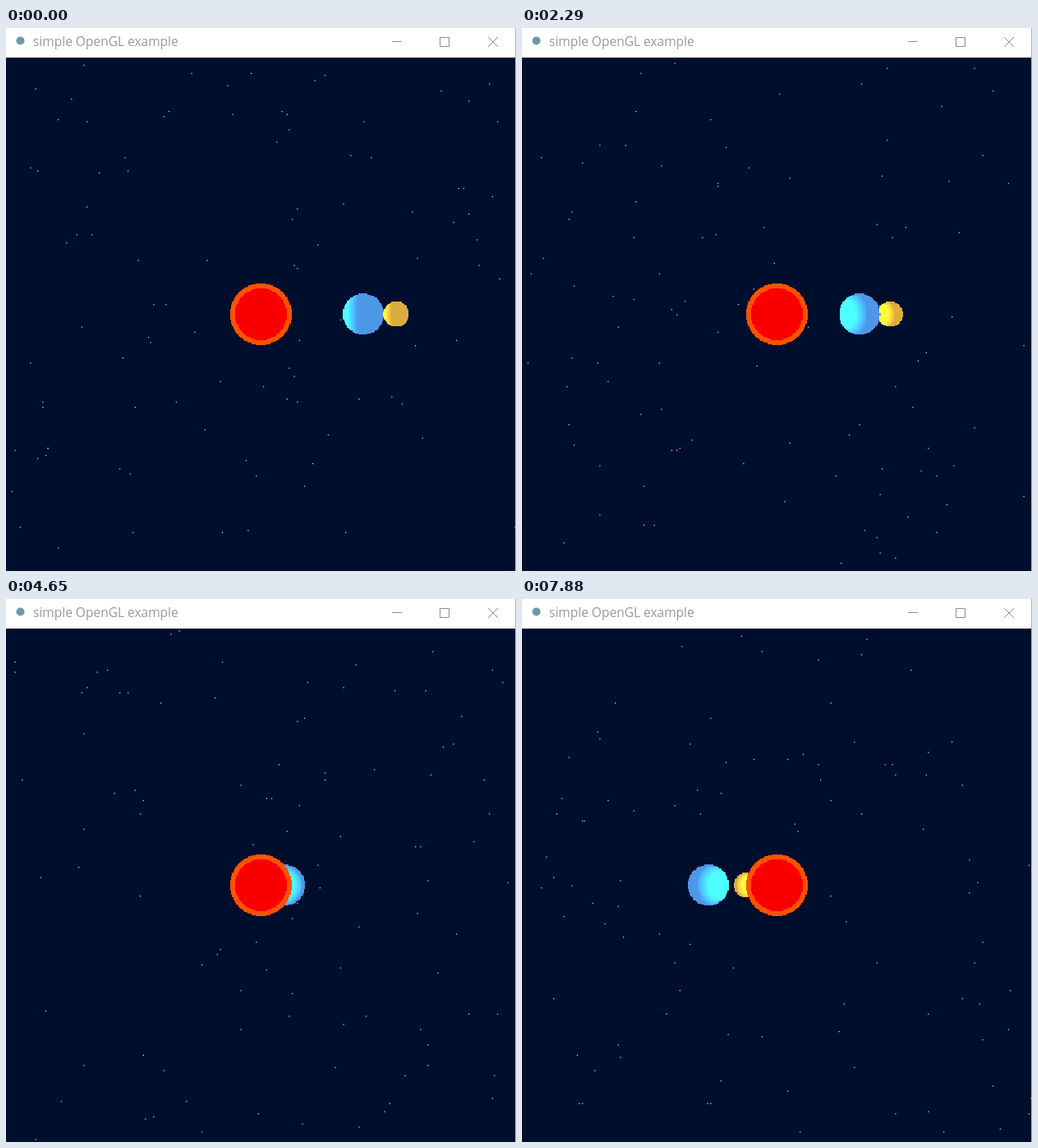
Write an HTML page with a canvas that moves like this. It is 621 px wide and 661 px high and loops after 8000 ms.

```html
<!DOCTYPE html>
<html lang="en">
<head>
<meta charset="utf-8">
<title>Orbits</title>
<style>
  html, body { margin: 0; width: 100%; height: 100%; overflow: hidden; background: #fff; }
  .window { position: relative; width: 621px; height: 661px; overflow: hidden; }
  .window > * { position: absolute; left: 0; top: 0; }
</style>
</head>
<body>
<div class="window">
  <canvas id="sky" width="621" height="661"></canvas>
  <svg width="621" height="661" fill="none" stroke="#8c8c8c">
    <circle cx="17.5" cy="15.5" r="5" fill="#6c98a8" stroke="none"/>
    <text x="33" y="22" fill="#999" stroke="none" font-size="15.5" font-family="'Open Sans', 'Noto Sans', sans-serif">simple OpenGL example</text>
    <path d="M470 16.5h12M528.5 11.5h11v11h-11zM587 11l12 12M599 11l-12 12"/>
    <path d="M620.5 0V661" stroke="#b4b4b8"/>
    <path id="cursor" d="M479.500 544.500v17l4-3.700 3 7 3-1.300-3-6.700h5.300z" fill="#fff" stroke="#000"/>
  </svg>
</div>
<script>
const LOOP = 8000;
const TOP = 36;
const LEFT = -2;
const CELL = 1.25; // the 500-pixel scene is shown enlarged
const CENTER = { x: 310.5, y: 348.5 };
const BOX = { x: 118, y: 308, w: 386, h: 82 };
const STARS = 100;

// The scene redraws in uneven steps: knots in ms and the steps between them.
const KNOTS = [0, 120, 960, 1110, 1230, 2140, 2290, 3290, 3440, 3680, 4380, 4530, 4650, 5380, 5780, 6780, 6900, 7880, LOOP];
const STEPS = [1, 6, 1, 1, 6, 1, 7, 1, 2, 5, 1, 1, 5, 1, 7, 1, 7, 1];
const ticks = STEPS.flatMap((n, k) => Array.from({ length: n }, (_, i) =>
  Math.round((KNOTS[k] + (KNOTS[k + 1] - KNOTS[k]) * i / n) / 10) * 10));

const cursor = document.getElementById('cursor');
const ctx = document.getElementById('sky').getContext('2d', { willReadFrequently: true });

const clamp = (v, lo, hi) => Math.min(hi, Math.max(lo, v));
const cellMiddle = (v, origin) => origin + (Math.floor((v - origin) / CELL) + 0.5) * CELL;

function random(seed) {
  let s = seed;
  return () => {
    s = (s + 0x6d2b79f5) | 0;
    let r = Math.imul(s ^ (s >>> 15), 1 | s);
    r = (r + Math.imul(r ^ (r >>> 7), 61 | r)) ^ r;
    return ((r ^ (r >>> 14)) >>> 0) / 4294967296;
  };
}

function orbit(parent, distance, degrees) {
  const a = degrees * Math.PI / 180;
  return { x: parent.x + distance * Math.cos(a), z: parent.z - distance * Math.sin(a) };
}

// Shade by the angle between the surface normal and the sun.
function lit({ x, z, r, base, glow }) {
  const d = Math.hypot(x, z);
  return (dx, dy, dz) => {
    const facing = -(dx * x + dz * z) / (r * d);
    const s = clamp((facing - 0.24) / 0.52, 0, 1);
    return base.map((c, i) => Math.min(255, c + glow[i] * s));
  };
}

const sunShade = (dx, dy) => Math.hypot(dx, dy) < 31.5 ? [248, 0, 0] : [255, 82, 0];

function bodies(ms) {
  const t = ms / 1000;
  const origin = { x: 0, z: 0 };
  const planet = { ...orbit(origin, 125, 17.1 * t - 2.8), r: 25, base: [77, 151, 230], glow: [0, 104, 104] };
  const moon = { ...orbit(planet, 47, 187.4 * t - 31.8), r: 15.6, base: [219, 172, 62], glow: [83, 83, 0] };
  return [
    { ...origin, r: 37.5, shade: sunShade },
    { ...planet, shade: lit(planet) },
    { ...moon, shade: lit(moon) }
  ];
}

function drawStars(seed) {
  const rnd = random(seed * 7919 + 17);
  const place = () => Math.floor(Math.floor(rnd() * 200) * 2.5) * CELL;
  ctx.fillStyle = '#d4d8e0';
  for (let i = 0; i < STARS; i++) {
    ctx.fillRect(LEFT + place(), TOP + place(), CELL, CELL);
  }
}

function drawBodies(ms) {
  const image = ctx.getImageData(BOX.x, BOX.y, BOX.w, BOX.h);
  const list = bodies(ms);
  for (let py = 0; py < BOX.h; py++) {
    const dy = cellMiddle(BOX.y + py + 0.5, TOP) - CENTER.y;
    for (let px = 0; px < BOX.w; px++) {
      const x = cellMiddle(BOX.x + px + 0.5, LEFT) - CENTER.x;
      let depth = -Infinity;
      let color = null;
      for (const b of list) {
        const dx = x - b.x;
        const h = b.r * b.r - dx * dx - dy * dy;
        if (h <= 0) continue;
        const dz = Math.sqrt(h);
        if (b.z + dz > depth) {
          depth = b.z + dz;
          color = b.shade(dx, dy, dz);
        }
      }
      if (color) image.data.set(color, (py * BOX.w + px) * 4);
    }
  }
  ctx.putImageData(image, BOX.x, BOX.y);
}

function draw(ms, seed) {
  ctx.fillStyle = '#000e2d';
  ctx.fillRect(0, 0, 621, 661);
  drawStars(seed);
  ctx.fillStyle = '#fff';
  ctx.fillRect(0, 0, 621, TOP);
  drawBodies(ms);
  cursor.style.display = ms >= 3440 && ms < 4100 ? '' : 'none';
}

let shown = -1;
const start = performance.now();

function update() {
  const ms = (performance.now() - start) % LOOP;
  const index = ticks.findLastIndex(t => t <= ms);
  if (index !== shown) {
    shown = index;
    draw(ticks[index], index);
  }
  requestAnimationFrame(update);
}
update();
</script>
</body>
</html>
```
